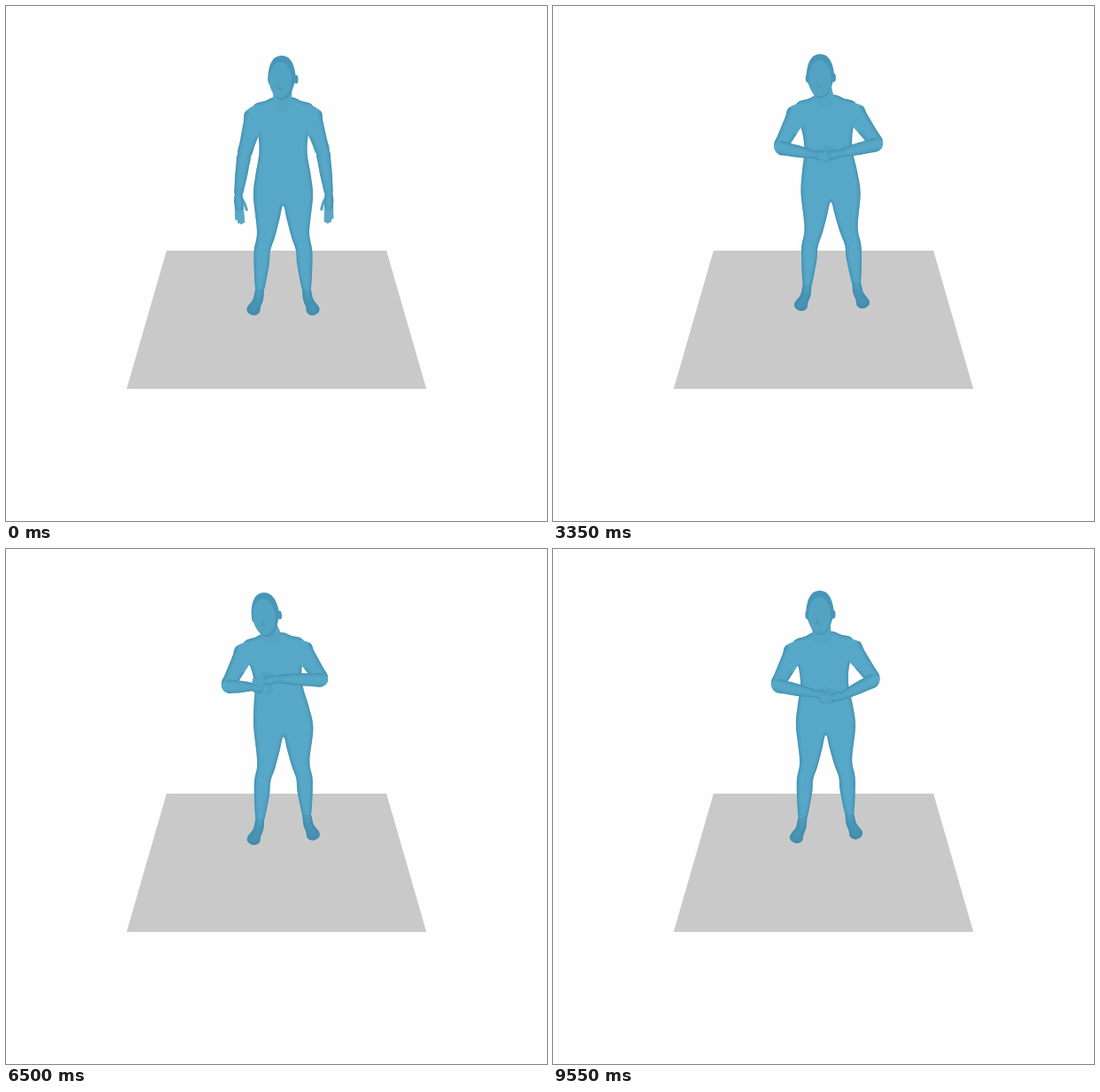
Recreate the animation shown at these times as an HTML page. Size 610x581 px, loop 9.6 s.

```html
<!DOCTYPE html>
<html lang="en">
<head>
<meta charset="utf-8">
<title>Figure on a floor</title>
<style>
html, body { margin: 0; width: 100%; height: 100%; overflow: hidden; background: #fefefe; }
svg { display: block; width: 610px; height: 581px; }
</style>
</head>
<body>
<svg id="stage" viewBox="0 0 610 581" xmlns="http://www.w3.org/2000/svg">
  <defs>
    <linearGradient id="footTone" x1="0" y1="0" x2="0" y2="1">
      <stop offset="0" stop-color="#57a8c8"/>
      <stop offset=".4" stop-color="#4a97b7"/>
      <stop offset="1" stop-color="#478fb0"/>
    </linearGradient>
  </defs>
  <path d="M181 276H429L474 432H136Z" fill="#c9c9c9"/>
  <g id="body"></g>
</svg>
<script>
const LOOP = 9600, STEP = 50, MID = 312.5;
const SKIN = '#57a8c8', SHADE = '#3f85a6';
const SIDES = [-1, 1];
const defs = document.querySelector('defs');
const body = document.getElementById('body');

function make(tag, attrs, parent) {
  const el = document.createElementNS('http://www.w3.org/2000/svg', tag);
  for (const k in attrs) el.setAttribute(k, attrs[k]);
  return parent.appendChild(el);
}

const clamp = v => Math.max(0, Math.min(1, v));
const mix = (a, b, k) => a + (b - a) * k;
const blend = (p, q, k) => [mix(p[0], q[0], k), mix(p[1], q[1], k)];
const add = (p, q) => [p[0] + q[0], p[1] + q[1]];
const ramp = (t, from, to) => clamp((t - from) / (to - from));
const ease = (t, from, to) => { const u = ramp(t, from, to); return u * u * (3 - 2 * u); };
const bump = (t, at, width) => Math.exp(-(((t - at) / width) ** 2));

// Half outlines, measured from the middle line; the other half is mirrored
const TRUNK = [
  [10, 103], [20, 107], [32, 111], [37, 123], [29, 142], [27, 165], [31, 190], [33.5, 215],
  [29.5, 255], [33, 280], [30.5, 325], [23, 325], [16, 293], [14.5, 276], [9.5, 261], [4, 240], [1.2, 227]
];
const FOOT = [
  [30.5, 319], [34, 331], [40.5, 340], [39.5, 346], [33, 349], [27, 346], [25.5, 339], [22.5, 331], [22.5, 319]
];
const place = side => ([x, y]) => [MID + side * x, y];
const trunkPts = TRUNK.map(place(1)).concat(TRUNK.map(place(-1)).reverse());

const skullPts = Array.from({ length: 16 }, (_, i) => {
  const a = i * Math.PI / 8, s = Math.sin(a), y = -25 * Math.cos(a);
  return [15.5 * Math.sign(s) * Math.abs(s) ** .85 * (1 - Math.max(0, y) / 110), y];
});

// Smooth path through points
function spline(p, closed = true) {
  const n = p.length;
  const at = i => closed ? p[(i + n) % n] : p[Math.max(0, Math.min(n - 1, i))];
  let d = 'M' + p[0].map(v => v.toFixed(2));
  for (let i = 0; i < (closed ? n : n - 1); i++) {
    const [a, b, c, e] = [at(i - 1), at(i), at(i + 1), at(i + 2)];
    d += 'C' + [b[0] + (c[0] - a[0]) / 6, b[1] + (c[1] - a[1]) / 6,
                c[0] - (e[0] - b[0]) / 6, c[1] - (e[1] - b[1]) / 6, c[0], c[1]].map(v => v.toFixed(2));
  }
  return closed ? d + 'Z' : d;
}

// Maps (share of the way from a to b, offset across) to the stage
function axis(a, b) {
  const dx = b[0] - a[0], dy = b[1] - a[1], len = Math.hypot(dx, dy) || 1;
  return (k, off) => [a[0] + dx * k + dy / len * off, a[1] + dy * k - dx / len * off];
}

// Rounded limb whose half width is radius(k); rims run along both sides
function limb(a, b, radius, side, skip = 0) {
  const at = axis(a, b), len = Math.hypot(b[0] - a[0], b[1] - a[1]) || 1;
  const ks = [0, .25, .5, .75, 1];
  const outer = ks.map(k => at(k, radius(k) * side));
  const inner = ks.map(k => at(k, -radius(k) * side));
  const start = at(-.9 * radius(0) / len, 0), end = at(1 + .9 * radius(1) / len, 0);
  return [
    spline([start, ...outer, end, ...inner.slice().reverse()]),
    spline(outer, false) + spline(inner.slice(skip), false)
  ];
}
const upperWidth = k => 11.8 - 4.3 * k;
const lowerWidth = k => 7.4 - 3 * k + Math.sin(Math.PI * k);
const palmWidth = k => 4 + 1.3 * Math.sin(Math.PI * k);

// Filled shape with darker edges kept inside it
let ids = 0;
function solid(parent, fill = SKIN) {
  const id = 'c' + ids++;
  const mask = make('path', {}, make('clipPath', { id }, defs));
  const shape = make('path', { fill }, parent);
  const g = make('g', { 'clip-path': `url(#${id})`, fill: 'none', stroke: SHADE }, parent);
  const rims = [make('path', { 'stroke-width': 8, opacity: .2 }, g),
                make('path', { 'stroke-width': 3.4, opacity: .45 }, g)];
  return (d, rim = d) => {
    [mask, shape].forEach(p => p.setAttribute('d', d));
    rims.forEach(p => p.setAttribute('d', rim));
  };
}

const trunk = solid(body);
const soles = SIDES.map(() => solid(body, 'url(#footTone)'));
const neck = make('path', { stroke: '#54a4c4', 'stroke-width': 21, 'stroke-linecap': 'round' }, body);
const skull = make('g', {}, body);
const ears = SIDES.map(() => make('ellipse', { cy: 2, rx: 2.4, ry: 5, fill: '#4a97b8' }, skull));
make('path', { d: spline(skullPts), fill: '#4896b7' }, skull);
const face = make('g', {}, skull);
make('ellipse', { cy: 2.5, rx: 12.5, ry: 20.5, fill: '#53a3c3' }, face);
make('path', { d: 'M-2 5L-3 12L2 13', fill: 'none', stroke: SHADE, opacity: .5 }, face);
const uppers = SIDES.map(() => solid(body));
const arms = SIDES.map(() => {
  const g = make('g', { fill: 'none', 'stroke-linecap': 'round' }, body);
  return {
    digits: [make('path', { stroke: SHADE, 'stroke-width': 3.2, opacity: .75 }, g),
             make('path', { stroke: SKIN, 'stroke-width': 2.2 }, g)],
    palm: solid(g),
    lower: solid(g)
  };
});

function fingers(wrist, tip, side) {
  const at = axis(wrist, tip);
  let d = `M${at(.12, -3.2 * side)}Q${at(.3, -7 * side)} ${at(.54, -8.2 * side)}`;
  for (let j = 0; j < 4; j++) {
    const off = (j - 1.5) * 2.3 * side;
    d += `M${at(.4, off)}L${at(1 - .04 * (j - 1) ** 2, off * 1.1)}`;
  }
  return d;
}

function draw(t) {
  // Whole-body drift: the figure steps back, leans aside and straightens up
  const rise = ease(t, 1000, 8000);
  const lean = -11 * ease(t, 700, 6500) + 3 * ease(t, 7700, 9550);
  const tops = [[lean, -8 * rise], [lean, -11 * rise]];
  const hip = [.6 * ease(t, 1000, 2600) - 5.6 * ease(t, 6000, 9600), -15 * ease(t, 1000, 8200)];
  const steps = [
    [hip[0] * .9, -17 * ease(t, 800, 8000)],
    [hip[0] * .9 + 5 * bump(t, 4100, 1000), -21.5 * ease(t, 500, 7500)]
  ];
  const warp = ([x, y]) => {
    const top = blend(tops[0], tops[1], ramp(x, 281, 343));
    const mid = blend(top, hip, ramp(y, 115, 210));
    return add([x, y], blend(mid, steps[x < MID ? 0 : 1], ramp(y, 215, 325)));
  };

  trunk(spline(trunkPts.map(warp)));
  SIDES.forEach((side, i) => {
    const p = FOOT.map(place(side)).map(warp);
    soles[i](spline(p), spline(p, false));
  });

  const nod = bump(t, 6500, 1800), yaw = .5 + 1.5 * Math.max(nod, bump(t, 0, 500));
  const hx = 311 - 20 * ramp(t, 0, 7000) + 10 * ease(t, 7500, 9550);
  const hy = 81 - 9 * ease(t, 1000, 9000);
  neck.setAttribute('d', `M${hx + 1} ${hy + 10}L${warp([311.5, 108])}`);
  skull.setAttribute('transform', `translate(${hx} ${hy}) rotate(${-1 - 5 * nod})`);
  face.setAttribute('transform', `translate(${-yaw * .8} 0)`);
  ears.forEach((ear, i) => ear.setAttribute('cx', SIDES[i] * 14.7 + yaw * .7));

  // Arms hang, rise to a clasp, lift higher, then sink again
  const raise = ease(t, 1000, 2600);
  const high = ease(t, 2600, 4600) - ease(t, 7900, 9550);
  const tuck = bump(t, 7700, 900);
  const chest = add([312, 122], blend(tops[0], tops[1], .5));
  const pose = [
    { elbow: blend([-13, 46], [-21, 40], raise),
      wrist: blend([-50, 91], blend([-8, 51], [-24, 42], high), raise),
      hand: blend([2, 32], [22, 4], raise) },
    { elbow: add(blend([14, 43], [27, 37], raise), [-17 * tuck, -9 * tuck]),
      wrist: blend([52, 90], blend([23, 53], [4, 33], high), raise),
      hand: blend([0, 32], [-26, 5], raise) }
  ];
  SIDES.forEach((side, i) => {
    const shoulder = add([MID + side * 31, 122], tops[i]);
    const elbow = add(shoulder, pose[i].elbow);
    const wrist = add(chest, pose[i].wrist);
    const tip = add(wrist, pose[i].hand);
    uppers[i](...limb(shoulder, elbow, upperWidth, side, 2));
    arms[i].lower(...limb(elbow, wrist, lowerWidth, side));
    arms[i].palm(...limb(wrist, blend(wrist, tip, .5), palmWidth, side));
    const d = fingers(wrist, tip, side);
    arms[i].digits.forEach(p => p.setAttribute('d', d));
  });
}

function tick() {
  const t = performance.now() % LOOP;
  draw(Math.floor(t / STEP) * STEP);
  requestAnimationFrame(tick);
}
tick();
</script>
</body>
</html>
```
